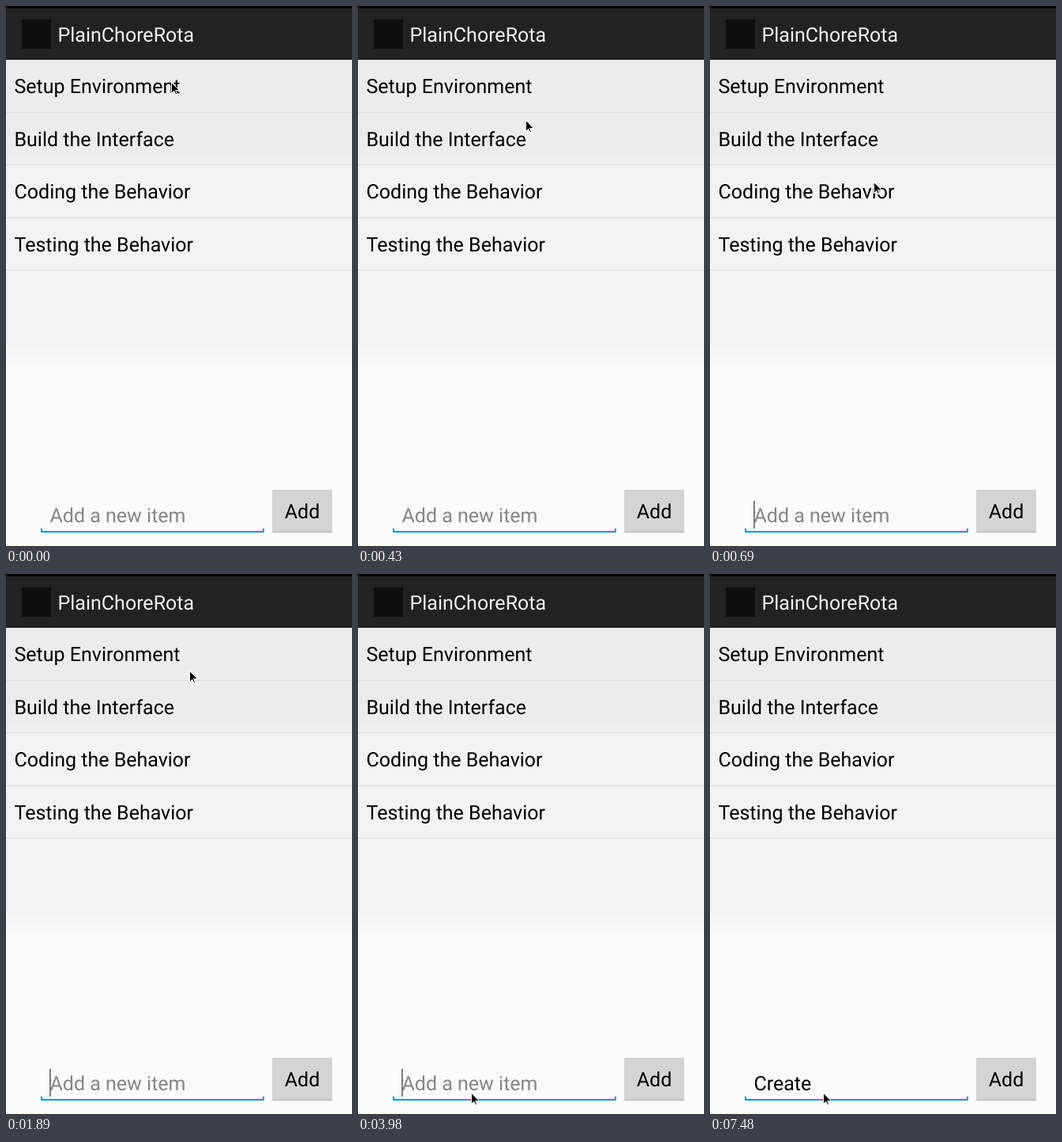
These frames come from a looping animation (438 by 682 pixels, 8 s). An HTML page:

```html
<!DOCTYPE html>
<html lang="en">
<head>
<meta charset="utf-8">
<title>To-do list</title>
<style>
html, body { margin: 0; width: 100%; height: 100%; overflow: hidden; background: #000; }
svg { display: block; width: 438px; height: 682px; }
text { font: 25px Roboto, sans-serif; text-rendering: geometricPrecision; }
</style>
</head>
<body>
<svg viewBox="0 0 438 682">
  <defs>
    <linearGradient id="page" gradientUnits="userSpaceOnUse" x1="0" y1="0" x2="0" y2="682">
      <stop offset=".264" stop-color="#ececec"/>
      <stop offset=".3" stop-color="#f3f3f3"/>
      <stop offset=".625" stop-color="#f3f3f3"/>
      <stop offset=".67" stop-color="#fbfbfb"/>
    </linearGradient>
  </defs>
  <g id="app">
    <rect width="438" height="682" fill="url(#page)"/>
    <rect width="438" height="68" fill="#222"/>
    <rect width="438" height="3"/>
    <rect x="20" y="17" width="37" height="37" fill="#0e0e0e"/>
    <text x="65.5" y="45" fill="#f1f1f1">PlainChoreRota</text>
    <g id="list"></g>
    <path d="M44 660h2v3h279v-3h2v5H44z" fill="#1797c0"/>
    <text id="field" x="55.5" y="652"></text>
    <rect id="caret" y="625" width="1.5" height="35" fill="#555"/>
    <rect x="337" y="611" width="76" height="54" rx="1" fill="#aaa"/>
    <rect x="337" y="611" width="76" height="53" rx="1" fill="#d4d4d4"/>
    <text x="375" y="647" text-anchor="middle">Add</text>
  </g>
  <path id="pointer" d="M.5.5V14.5L3.5 11.5L5.5 15.5H7.5L6 10.5H10.5Z" stroke="#fff" shape-rendering="crispEdges"/>
</svg>
<script>
const LOOP = 8000, TICK = 137, BLINK = 504;
const WORD = "Create", FIRST_KEY = 6120, SECOND_KEY = 6520, KEY_GAP = 93;
const $ = id => document.getElementById(id);

["Setup Environment", "Build the Interface", "Coding the Behavior", "Testing the Behavior"]
  .forEach((label, i) => {
    const y = i * 66.5;
    $("list").innerHTML +=
      `<text x="10.5" y="${Math.round(110 + y)}">${label}</text>` +
      `<rect y="${Math.floor(134 + y)}" width="438" height="1" fill="#dadada"/>`;
  });

// pointer strokes: each starts where the last one ended
const home = { x: 209, y: 96 };
const strokes = [
  { from: 140, to: 770, x: 207, y: 225, bow: 4 },
  { from: 1650, to: 1918, x: 232, y: 122 },
  { from: 2466, to: 2740, x: 230, y: 184 },
  { from: 3151, to: 3425, x: 163, y: 494 },
  { from: 3600, to: 3973, x: 143, y: 655 }
];

const ease = u => u * u * u * (10 - 15 * u + 6 * u * u);

function pointerAt(t) {
  const now = Math.floor(t / TICK + .2) * TICK;   // the screen recorder's frame rate
  let { x, y } = home;
  for (const s of strokes) {
    const u = (now - s.from) / (s.to - s.from);
    const e = ease(Math.min(1, Math.max(0, u)));
    x += (s.x - x) * e + (s.bow || 0) * 4 * e * (1 - e);
    y += (s.y - y) * e;
  }
  return `translate(${Math.round(x)} ${Math.round(y)})`;
}

function lettersAt(t) {
  if (t < FIRST_KEY) return 0;
  if (t < SECOND_KEY) return 1;
  return Math.min(WORD.length, 2 + Math.floor((t - SECOND_KEY) / KEY_GAP));
}

function caretAt(t) {
  if (t >= FIRST_KEY) return t < 7480;
  return t >= 490 && Math.floor((t - 490) / BLINK) % 2 === 0;
}

// two short flashes to black
const isDark = t => t >= 150 && t < 690 && (t - 150) % 420 < 120;

const show = (id, on) => $(id).style.display = on ? "" : "none";

function draw(t) {
  const text = WORD.slice(0, lettersAt(t));
  const field = $("field");
  show("app", !isDark(t));
  field.textContent = text || "Add a new item";
  field.setAttribute("fill", text ? "#000" : "#868686");
  $("caret").setAttribute("x", text ? 53.7 + field.getComputedTextLength() : 55.2);
  show("caret", caretAt(t));
  $("pointer").setAttribute("transform", pointerAt(t));
}

const start = performance.now();
function tick() {
  draw((performance.now() - start) % LOOP);
  requestAnimationFrame(tick);
}
tick();
</script>
</body>
</html>
```
